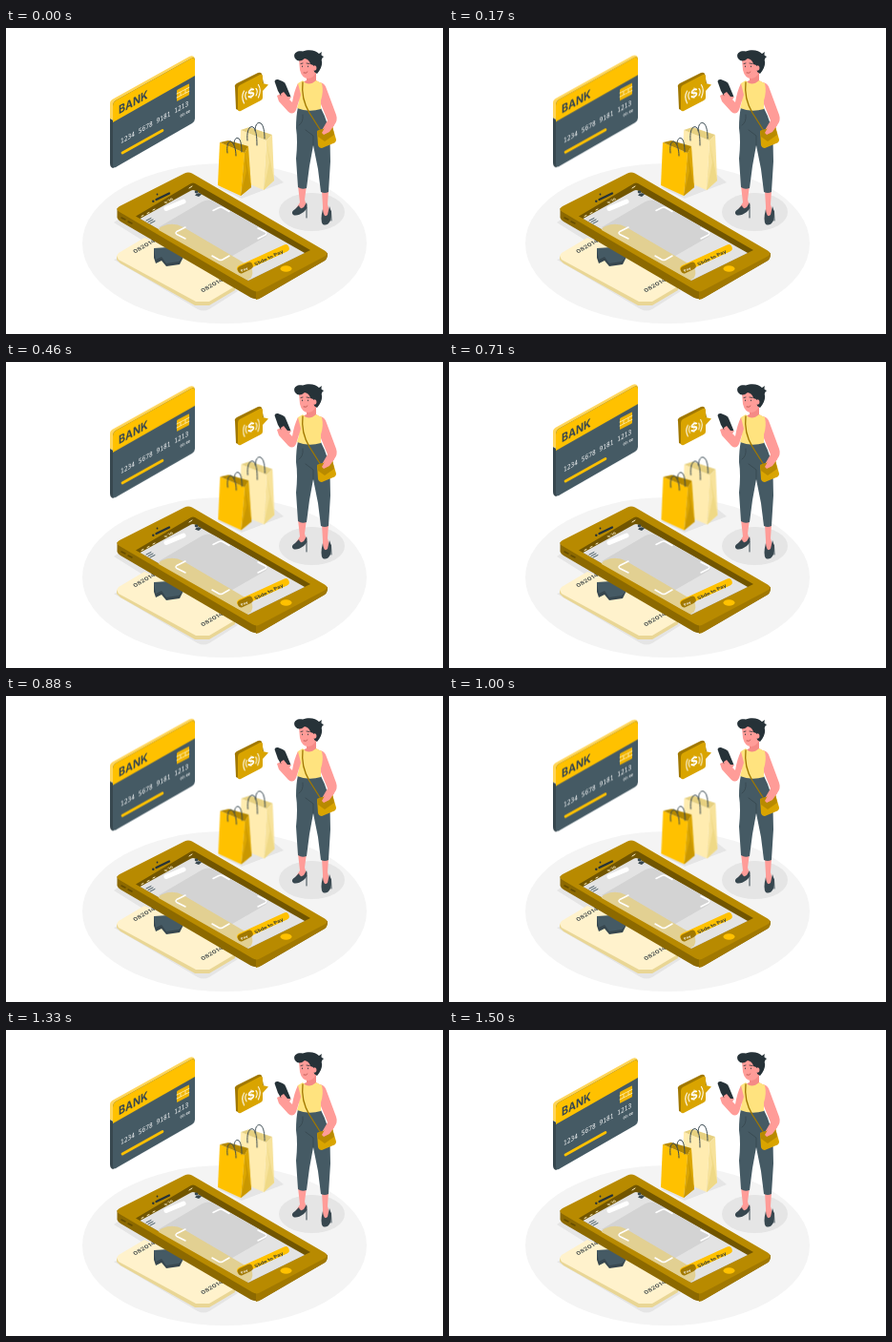
Recreate the animation shown at these times as an HTML page. Size 458x321 px, loop 1.54 s.

```html
<!DOCTYPE html>
<html lang="en">
<head>
<meta charset="utf-8">
<title>Mobile payment</title>
<style>
  html, body { margin: 0; width: 100%; height: 100%; overflow: hidden; background: #fff; }
  svg { display: block; width: 100vw; height: 100vh; }
  text { font-family: Inter, sans-serif; }
  .mono { font-family: "Noto Sans Mono", monospace; }
  .line { fill: none; stroke-linecap: round; stroke-linejoin: round; }
  .card, .bags, .waves { animation: float 1540ms cubic-bezier(.37, 0, .63, 1) infinite; }
  .bags { animation-name: drift; }
  .waves { animation-name: pulse; transform-origin: 257px 69px; }
  @keyframes float { 48% { transform: translateY(-6px); } }
  @keyframes drift { 48% { transform: translate(.5px, .5px); } }
  @keyframes pulse { 48% { transform: scale(.9); } }
</style>
</head>
<body>
<svg viewBox="0 0 458 321" xmlns="http://www.w3.org/2000/svg">
  <g id="floor">
    <ellipse cx="229" cy="226" rx="149" ry="84" fill="#f4f4f4"/>
    <ellipse cx="320.500" cy="193" rx="34.500" ry="20" fill="#e5e5e5"/>
    <path d="M222 167L247 179 291 162 281 154Z" fill="#e5e5e5"/>
    <path d="M113 204L119 200 155 222 145 224ZM113 243L120 241 206 287 238 272 243 276 213 295Q207 298 201 295Z" fill="#e5e5e5"/>
  </g>

  <g id="ticket">
    <path d="M116 239V243L120 247 198 291 213 291 240 275V268Z" fill="#e9d695"/>
    <path d="M116 239L118 236 145 220 250 265 213 287 199 287 118 243Z" fill="#fff2cc"/>
    <g font-size="7" font-weight="500" fill="#263238">
      <text transform="matrix(.87 -.5 .5 .6 135 236.500)">082014</text>
      <text transform="matrix(.87 -.5 .5 .6 206 277.500)">082014</text>
    </g>
    <path d="M155 231V241L157 247 163 244 168 250 182 248 186 240Z" fill="#37474f"/>
    <path d="M155 231L170 230 186 240 181 245 168 247 163 240 157 243Z" fill="#455a64"/>
  </g>

  <g id="phone">
    <path d="M116.500 189V199Q117 201 120 203L256 282.500Q262 286 268 282.500L334 244Q337 242 337 236Z" fill="#8c6900"/>
    <path d="M262 276V285Q265 284.500 268 282.500L334 244Q337 242 337 236Z" fill="#a17800"/>
    <path d="M119 187L187 152.500Q191 150.500 195 152.500L334 233.500Q339 236.500 334 239.500L266 275.500Q262 277.500 258 275L119 193Q114 190 119 187Z" fill="#b88a00"/>
    <path d="M121 199L125 201M128 203L132 205" class="line" stroke="#664d00" stroke-width="1.500"/>
    <path d="M136 197.500L194 163Q196 162 198 163L319 233 254 265Z" fill="#715500"/>
    <path d="M140.500 200L194 170.500Q196 169.500 198 170.500L313 236 254 265Z" fill="#e3e3e3"/>
    <path d="M160 209L206 182Q212 179 218 182L272 213Q276 216 272 219L232 242Z" fill="#d3d3d3"/>
    <path d="M160 213Q159 210 164 208 175 203 186 209L254 249Q261 253 257 262L253 264.500 242 258.500 160 212Z" fill="#e2d092"/>
    <path d="M157.500 180L171 173.500" class="line" stroke="#263238" stroke-width="2.300"/>
    <circle cx="154.300" cy="181.800" r="1.200" fill="#263238"/>
    <circle cx="158.500" cy="174.500" r=".9" fill="#263238"/>
    <g class="line" stroke="#fff0c4" stroke-width="1">
      <path d="M142 197.500l2-1M148 194.500l2-1M154 191l2-1M192 168l3-2"/>
    </g>
    <path d="M147 202l5-2.500M149 203.500l5-2.500M151 205l5-2.500" class="line" stroke="#455a64" stroke-width="1"/>
    <text transform="matrix(.87 -.5 .6 .5 167 184.500)" font-size="4.500" font-weight="600" fill="#fff0c4">9:36</text>
    <path d="M168 189.500L186 182" class="line" stroke="#fff" stroke-width="5"/>
    <g fill="#37474f">
      <ellipse cx="199.500" cy="172" rx="1.800" ry="1.400"/>
      <path d="M198 175.500q3-4 7-1l-3 2.500Z"/>
    </g>
    <g class="line" stroke="#fff" stroke-width="1.500">
      <path d="M217 191.500L223 188.500Q225 187.500 227 188.500L234 192.500"/>
      <path d="M188 209L179 213.500Q177 215 179 216.500L188 221"/>
      <path d="M264 210L272 214Q274 215.500 272 217L264 221"/>
      <path d="M216 239L223 243Q225 244 227 243L234 239"/>
    </g>
    <path d="M246 252.500L293 231" class="line" stroke="#ffc100" stroke-width="7.500"/>
    <path d="M246.500 253.500L255 249.500" class="line" stroke="#a17800" stroke-width="7.500"/>
    <g font-weight="600">
      <text transform="matrix(.87 -.42 .5 .6 247 256)" font-size="4.500" fill="#fff">Pay</text>
      <text transform="matrix(.88 -.42 .45 .65 261.500 249.500)" font-size="6" fill="#263238">Slide to Pay</text>
    </g>
    <ellipse cx="293.500" cy="252.500" rx="6" ry="3.200" fill="#ffc100"/>
  </g>

  <g class="card">
    <path d="M109 79Q109 76 113 74L192 30Q197 28 198 32L116 98 109 95Z" fill="#ffd559"/>
    <path d="M109 95L116 99V145L112 147Q109 146 109 142Z" fill="#37474f"/>
    <path d="M112 82Q112 78 115 76L194 32Q198 30 198 34V95Q198 98 195 100L115 146Q112 147 112 143Z" fill="#455a64"/>
    <path d="M112 99V82Q112 78 115 76L194 32Q198 30 198 34V50Z" fill="#ffc100"/>
    <text transform="matrix(.87 -.48 0 1 118 90.500)" font-size="12.200" font-weight="700" fill="#37474f">BANK</text>
    <g transform="matrix(1 -.52 0 1 179 65)">
      <rect width="13" height="12" rx="1" fill="#f0b400"/>
      <path d="M0 4H4V8H0M13 4H9V8H13M4 4H9M4 8H9" class="line" stroke="#fff0b9" stroke-width=".8"/>
    </g>
    <text class="mono" transform="matrix(.87 -.49 0 1 120 121.500)" font-size="7.200" fill="#fff">1234 5678 9181 1213</text>
    <text class="mono" transform="matrix(.87 -.47 0 1 182.500 94)" font-size="4" fill="#fff">00/00</text>
    <path d="M122 131L164 107.500" class="line" stroke="#ffc100" stroke-width="2.700"/>
  </g>

  <g id="bubble">
    <path d="M240 62Q239 60 242 58L264 47Q267 46 268 48L270 58 245 87 241 85Z" fill="#a17800"/>
    <path d="M243 64Q243 61 245 60L266 49Q269 48 269 51V58L275 59.500 269 66V73Q269 75 267 76L246 87Q243 88 243 85Z" fill="#d9a400"/>
    <text transform="matrix(.95 -.4 0 1 253 74.500)" font-size="12.500" font-weight="700" fill="#fff">$</text>
    <g class="waves line" stroke="#fff" stroke-width="1.100">
      <path d="M252 67Q249.500 71 252 75M249.500 66Q246 72 249.500 79M262 63.500Q264.500 66 262 71M264.500 59.500Q268 65 264.500 73"/>
    </g>
  </g>

  <g class="bags">
    <path d="M246 107L273 118 270 170 244 159Z" fill="#ffecb0"/>
    <path d="M246 107L255 104 279 112 273 118Z" fill="#e6d080"/>
    <path d="M273 118L279 112 281 160 270 170Z" fill="#f7e29a"/>
    <path d="M273 118L276 141 270 170 281 160Z" fill="#efd986"/>
    <path d="M253 118C252 108 255 102 259 104 262 106 263 113 263 123M261 108C261 101 264 98 267 100 270 102 271 109 271 116" class="line" stroke="#37474f"/>
    <path d="M224 120L250 131 246 176 222 165Z" fill="#ffc100"/>
    <path d="M224 120L233 118 254 124 250 131Z" fill="#b38700"/>
    <path d="M250 131L254 124 257 167 246 176Z" fill="#dba600"/>
    <path d="M250 131L252 150 246 176 257 167Z" fill="#c99700"/>
    <path d="M232 131C231 123 233 118 236 119 239 121 241 127 241 134M239 122C239 117 241 114 244 116 246 118 247 123 247 130" class="line" stroke="#37474f"/>
  </g>

  <g id="woman">
    <g fill="#ff9c98">
      <path d="M306 165H315L313 180 315 187 305 195 301 194 308 183Z"/>
      <path d="M331 170H338L337 185 340 196 336 205 332 203 332 187Z"/>
    </g>
    <g fill="#37474f">
      <path d="M307 186Q308 191 312 188L315 183Q317 189 312 193 305 198 301 196 298 193 303 190Z"/>
      <path d="M332 190Q333 200 337 196L339 187Q342 194 340 202 337 208 332 206 329 202 332 190Z"/>
      <path d="M315 188V199M340.500 192L341 202" class="line" stroke="#37474f"/>
    </g>
    <path d="M306 83L330 84Q338 99 339.500 116L340 140 338 172Q334 174 330 172L327 148 322 123 318 145 315 168Q310 170 306 167L304 137Q306 118 304 105 304 92 306 83Z" fill="#455a64"/>
    <path d="M314 107L322 113 322 123M311 91Q312 99 307 102" class="line" stroke="#37474f" stroke-width=".8"/>
    <path d="M328 57Q334 57 336 64L346 91Q348 97 344 102L335 111 330 109 337 97 328 75Z" fill="#ff9c98"/>
    <path d="M315 46H325L325 55 330 58 321 64 310 57 315 55Z" fill="#f58a86"/>
    <path d="M311 55Q317 62 325 55L331 58Q333 67 330 76L330 85Q317 89 305 84L307 77Q303 65 306 58Z" fill="#ffe37f"/>
    <path d="M306 58Q302 66 300 78L296 74 297 70 288 69 284 71 286 77 296 88Q301 92 304 86L309 70Z" fill="#ff9c98"/>
    <path d="M281.500 56Q282 53.500 285 54L290 56Q292 57 293 59L298 71Q299 74 296 74L288 71 285 66Z" fill="#263238"/>
    <path d="M288 69L291 67 295 72 299 72 296 77 289 76Z" fill="#ff9c98"/>
    <path d="M311 57Q309 74 318 89L330 108" class="line" stroke="#a17800" stroke-width="1.300"/>
    <path d="M326 108L342 103 346 117Q346 120 343 121L331 126Q328 126 327 123Z" fill="#d9a400"/>
    <path d="M326 108L342 103 344 112 334 119 327 114Z" fill="#b88a00"/>
    <path d="M336 101L344 97 344 102 339 109 333 112 331 110Z" fill="#ff9c98"/>
    <path d="M307 33Q311 29 316 29L326 33 326 45Q323 52 317 53 310 53 308 44Z" fill="#ff9c98"/>
    <path d="M303 32C300 27 305 23 311 24.500 317 22 325 23 328 27L331 25Q330 28 331 29L333 30Q330 32 331 35 332 41 326 48L323 46 322 39 319 38Q318 33 313 32 307 37 303 32Z" fill="#263238"/>
    <ellipse cx="323.500" cy="42" rx="2" ry="2.700" fill="#ff9c98"/>
    <g class="line" stroke="#263238" stroke-width=".8">
      <path d="M309 37.500l2-.5M315 37l3 .5M310.500 40v.7M316.500 40v.7"/>
      <path d="M312 47Q315 48 316 46" stroke="#b34d48"/>
    </g>
  </g>
</svg>
</body>
</html>
```
